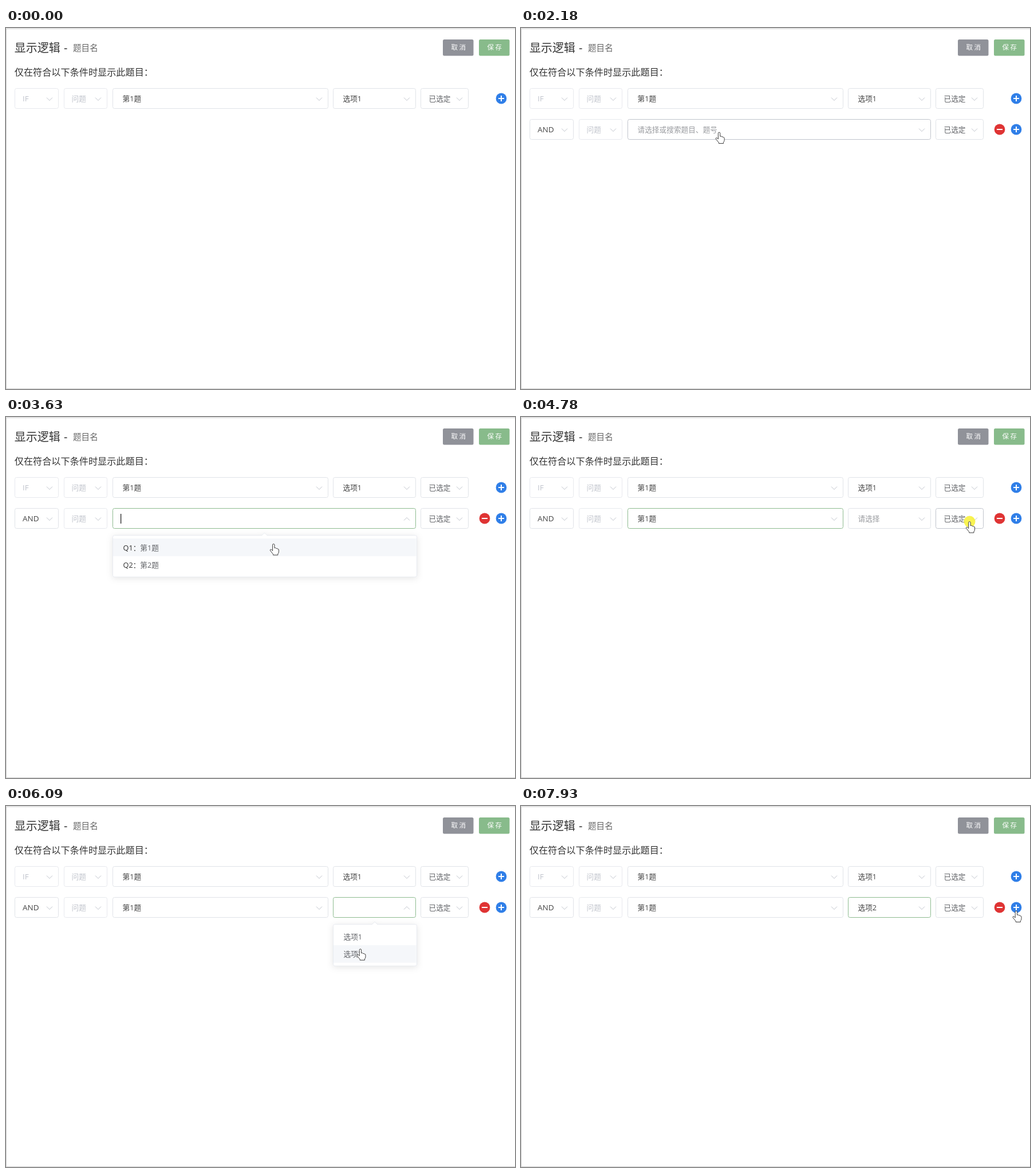
Animation, 889 px wide and 630 px high, one loop 8000 ms. Source, as an HTML page:

```html
<!DOCTYPE html>
<html lang="zh-CN">
<head>
<meta charset="utf-8">
<title>显示逻辑</title>
<style>
  html, body { margin: 0; width: 100%; height: 100%; overflow: hidden; background: #fff; }
  svg { display: block; width: 889px; height: 630px; }
  text { font-family: "Open Sans", "Noto Sans CJK SC", "Noto Sans CJK", sans-serif; white-space: pre; }
  .menu { filter: drop-shadow(0 2px 6px rgba(0, 0, 0, .1)); }
</style>
</head>
<body>
<svg id="stage" viewBox="0 0 889 630" lang="zh-CN"></svg>
<script>
const LOOP = 8000;
const FONT = 12.7;
const ITEM = 30.8;
const ROW = 54;
const TOP = 105;
const HEIGHT = 36;
const MENU_TOP = TOP + ROW + HEIGHT + 11;
const C = {
  line: '#e0e3e8', faint: '#e7e9ee', hover: '#c0c4cc', focus: '#8dbb8f',
  title: '#333', value: '#444', label: '#636569', hint: '#999b9f', off: '#c0c4cc',
  blue: '#307fe8', red: '#df3434', green: '#67a96b'
};

// Left and right edges of each column
const COL = { join: [15, 92], kind: [101, 177], question: [186, 563], option: [571, 716], state: [724, 808] };
const WIDE = [COL.question[0], COL.option[1]];
const PLUS = 865, MINUS = 836;

// Moments of the clicks, in order
const CLICK = { add: 1145, question: 3210, pick: 4040, state: 4850, option: 5690, choose: 6760 };

const moves = [
  { from: 130, to: 880, x: 856, y: 128 },
  { from: 1330, to: 1800, x: 156, y: 217 },
  { from: 1800, to: 2750, x: 694, y: 182.5, bow: -25 },
  { from: 3270, to: 3640, x: 467, y: 221.5 },
  { from: 4110, to: 4710, x: 783.5, y: 182.5 },
  { from: 5300, to: 5600, x: 667, y: 181 },
  { from: 5740, to: 6090, x: 619, y: 249.5 },
  { from: 6110, to: 6360, x: 619, y: 258 },
  { from: 6830, to: 7450, x: 778, y: 214.5 },
  { from: 7520, to: 7930, x: 865, y: 183 }
];

const clamp = v => Math.max(0, Math.min(1, v));
const smooth = u => u * u * (3 - 2 * u);
const easeOut = v => 1 - (1 - clamp(v)) ** 4;
const between = (v, [a, b]) => v >= a && v < b;
const openness = (t, from, to) => t < to ? easeOut((t - from) / 300) : 1 - easeOut((t - to) / 300);

function pointerAt(t) {
  let p = { x: 845, y: 634 };
  for (const { from, to, x, y, bow = 0 } of moves) {
    const s = smooth(clamp((t - from) / (to - from)));
    p = { x: p.x + (x - p.x) * s, y: p.y + (y - p.y) * s + 4 * s * (1 - s) * bow };
  }
  return p;
}

const text = (x, middle, str, fill, size = FONT, extra = '') =>
  `<text x="${x}" y="${middle + size * .37}" font-size="${size}" fill="${fill}" ${extra}>${str}</text>`;

function select([x, right], y, label, { color = C.value, border = C.line, pad = 17.5, open = 0, size } = {}) {
  return `<rect x="${x + .5}" y="${y + .5}" width="${right - x - 1}" height="${HEIGHT - 1}" rx="3" fill="#fff" stroke="${border}"/>` +
    text(x + pad, y + 18, label, color, size) +
    `<path d="M-5-2.5 0 2.5 5-2.5" transform="translate(${right - 16} ${y + 19}) rotate(${180 * open})"
      fill="none" stroke="${C.off}"/>`;
}

const round = (x, y, color, plus) =>
  `<circle cx="${x}" cy="${y}" r="9.4" fill="${color}"/>
   <path d="M${x - 5} ${y}h10${plus ? `M${x} ${y - 5}v10` : ''}" stroke="#fff" stroke-width="2"/>`;

const button = (x, label, color) =>
  `<rect x="${x}" y="20" width="53.5" height="28.5" rx="2.5" fill="${color}"/>` +
  text(x + 14.5, 34, label, '#fff', 11.5, 'letter-spacing="2.5" font-weight="500"');

function menu([x, end], items, open, pointer, picked = -1) {
  if (open < .01) return '';
  const right = end + 1, bottom = MENU_TOP + items.length * ITEM + 12, mid = (x + right) / 2;
  const row = Math.floor((pointer.y - MENU_TOP - 6) / ITEM);
  const hovered = between(pointer.x, [x, right]) && items[row] ? row : picked;
  const rows = items.map((label, i) => {
    const y = MENU_TOP + 6 + i * ITEM;
    const band = i === hovered ? `<rect x="${x + 1}" y="${y}" width="${right - x - 1.5}" height="${ITEM}" fill="#f5f7fa"/>` : '';
    const style = i === picked ? [C.green, FONT, 'font-weight="700"'] : [C.label];
    return band + text(x + 18.5, y + 16, label, ...style);
  }).join('');
  return `<g class="menu" opacity="${open}" transform="translate(0 ${MENU_TOP * (1 - open)}) scale(1 ${open})">
    <rect x="${x + .5}" y="${MENU_TOP + .5}" width="${right - x}" height="${bottom - MENU_TOP - 1}" rx="3" fill="#fff" stroke="#e8ebf0"/>
    <path d="M${mid - 5} ${MENU_TOP + 1}l5-5 5 5" fill="#fff" stroke="#e8ebf0"/>${rows}</g>`;
}

function row(y, join, joinColor, fields) {
  return select(COL.join, y, join, { color: joinColor, border: joinColor === C.off ? C.faint : C.line, pad: 14, size: 13.5 }) +
    select(COL.kind, y, '问题', { color: C.off, border: C.faint, pad: 13.5 }) +
    fields + round(PLUS, y + 18, C.blue, true);
}

const stateField = (y, style) => select(COL.state, y, '已选定', { color: C.label, pad: 14.5, ...style });

const firstRow = row(TOP, 'IF', C.off,
  select(COL.question, TOP, '第1题') + select(COL.option, TOP, '选项1') + stateField(TOP));

function secondRow(t, pointer, open) {
  const y = TOP + ROW, picked = t >= CLICK.pick;
  const questionBox = picked ? COL.question : WIDE;
  const overRow = between(pointer.y, [y, y + HEIGHT]);
  const border = (box, from, to) =>
    between(t, [from, to]) ? C.focus : overRow && between(pointer.x, box) ? C.hover : C.line;

  const question = picked ? '第1题' : t < CLICK.question ? '请选择或搜索题目、题号' : '';
  const option = t < CLICK.option ? '请选择' : t < CLICK.choose ? '' : '选项2';
  const fields =
    select(questionBox, y, question, {
      color: picked ? C.value : C.hint, open: open.question,
      border: border(questionBox, CLICK.question, CLICK.state)
    }) +
    (picked ? select(COL.option, y, option, {
      color: t < CLICK.option ? C.hint : C.value, open: open.option,
      border: border(COL.option, CLICK.option, LOOP)
    }) : '') +
    stateField(y, { open: open.state, border: border(COL.state, CLICK.state, CLICK.option) });

  const caret = between(t, [CLICK.question, CLICK.pick])
    ? '<rect x="200" y="169" width="1.3" height="17" fill="#222"/>' : '';
  const numbered = n => `<tspan fill="${C.title}">Q${n}：</tspan>第${n}题`;
  return row(y, 'AND', C.value, fields) + round(MINUS, y + 18, C.red, false) + caret +
    menu(WIDE, [1, 2].map(numbered), open.question, pointer) +
    menu(COL.state, ['已选定', '未选定', '已显示', '未显示'], open.state, pointer, 0) +
    menu(COL.option, ['选项1', '选项2'], open.option, pointer, t >= CLICK.choose ? 1 : -1);
}

function isClickable({ x, y }, open) {
  const overFields = between(y, [TOP + ROW, TOP + ROW + HEIGHT]) && between(x, [WIDE[0], COL.state[1]]);
  const overPlus = [0, 1].some(i => Math.hypot(x - PLUS, y - TOP - 18 - i * ROW) < 12);
  const overMenu = y > MENU_TOP && (open.question > .5 || open.option > .5);
  return overFields || overPlus || overMenu;
}

function cursor(t, pointer, open) {
  const { x, y } = pointer;
  const hand = 'M-1.8 1.8a1.7 1.7 0 0 1 3.4 0V7.2Q4 6.2 4.6 8 6.8 7.2 7.2 9 9 8.6 9 10.6V13.5Q9 16 7.4 17.5V19.5H-.8V18L-5.8 11.8Q-6.6 10-5 9.6-3.5 9.6-1.8 12z';
  const arrow = 'M.5 .5V14.5L3.7 11.5 6 17 8.2 16 6 10.7H10.3z';
  const pressed = Object.values(CLICK).some(c => between(t, [c - 70, c + 65]));
  return (pressed ? `<circle cx="${x}" cy="${y}" r="10" fill="#f8f02c" opacity=".82"/>` : '') +
    `<path d="${isClickable(pointer, open) ? hand : arrow}" transform="translate(${x} ${y})"
      fill="#fff" stroke="#3c3c3c" stroke-linejoin="round"/>`;
}

const heading =
  '<path d="M0 1.2H889" stroke="#c4c4c4"/><path d="M.5 1V630M0 629.5H889" stroke="#cfcfcf"/>' +
  text(14.8, 35, '显示逻辑', C.title, 20) +
  text(101, 35, '-', C.title, 20) +
  text(117, 35, '题目名', '#666', 14.6) +
  text(14.8, 77.3, '仅在符合以下条件时显示此题目：', C.title, 16.15) +
  button(763, '取消', '#909299') + button(826, '保存', '#88bb8b');

const stage = document.getElementById('stage');

function render(t) {
  const pointer = pointerAt(t);
  const open = {
    question: openness(t, CLICK.question, CLICK.pick),
    state: openness(t, CLICK.state, CLICK.option),
    option: openness(t, CLICK.option, CLICK.choose)
  };
  const added = t >= CLICK.add + 65 ? secondRow(t, pointer, open) : '';
  stage.innerHTML = heading + firstRow + added + cursor(t, pointer, open);
}

const start = performance.now();
function tick() {
  render((performance.now() - start) % LOOP);
  requestAnimationFrame(tick);
}
tick();
</script>
</body>
</html>
```
